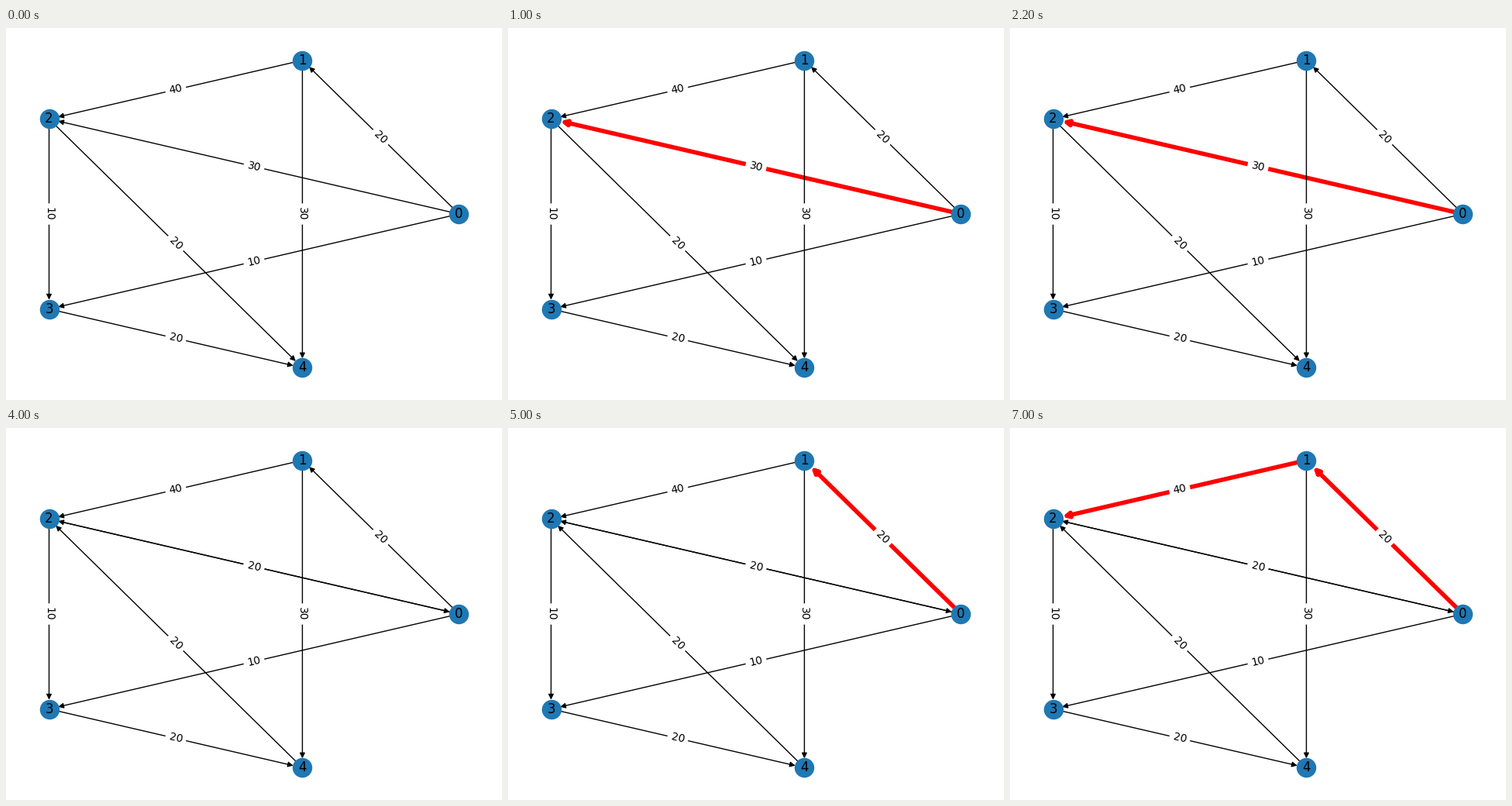
A matplotlib script for the animation above (8000 ms loop, 640 by 480 pixels).

```python
import math

import matplotlib.pyplot as plt
from matplotlib.animation import FuncAnimation
from matplotlib.patches import FancyArrowPatch

plt.rcParams["font.family"] = "DejaVu Sans"

NODE_SIZE = 300
SHRINK = math.sqrt(NODE_SIZE) / 2
PAD = 0.105  # margin around the nodes, as a share of their extent

# Nodes evenly spaced on the unit circle
POS = [(math.cos(2 * math.pi * k / 5), math.sin(2 * math.pi * k / 5))
       for k in range(5)]

# (tail, head): capacity
START = {(0, 1): 20, (0, 2): 30, (0, 3): 10, (1, 2): 40, (1, 4): 30,
         (2, 3): 10, (2, 4): 20, (3, 4): 20}
RESIDUAL = {(0, 1): 20, (0, 2): 10, (0, 3): 10, (1, 2): 40, (1, 4): 30,
            (2, 3): 10, (2, 0): 20, (3, 4): 20, (4, 2): 20}

# One entry per second: the graph and the highlighted path
STEPS = [
    (START, []),
    (START, [(0, 2)]),
    (START, [(0, 2)]),
    (START, [(0, 2), (2, 4)]),
    (RESIDUAL, []),
    (RESIDUAL, [(0, 1)]),
    (RESIDUAL, [(0, 1)]),
    (RESIDUAL, [(0, 1), (1, 2)]),
]

fig = plt.figure(figsize=(6.4, 4.8), dpi=100, facecolor="white")
ax = fig.add_axes((0, 0, 1, 1))


def padded(values):
    low, high = min(values), max(values)
    pad = PAD * (high - low)
    return low - pad, high + pad


XLIM = padded([x for x, _ in POS])
YLIM = padded([y for _, y in POS])


def draw_edge(tail, head, on_path):
    ax.add_patch(FancyArrowPatch(
        POS[tail], POS[head], arrowstyle="-|>", mutation_scale=10,
        shrinkA=SHRINK, shrinkB=SHRINK, zorder=1,
        color="red" if on_path else "black",
        linewidth=4 if on_path else 1))


def draw_capacity(tail, head, capacity):
    (x1, y1), (x2, y2) = POS[tail], POS[head]
    dx = (x2 - x1) * 640 / (XLIM[1] - XLIM[0])
    dy = (y2 - y1) * 480 / (YLIM[1] - YLIM[0])
    angle = round(math.degrees(math.atan2(dy, dx)), 6)
    # Keep the label from standing upside down
    if angle > 90:
        angle -= 180
    elif angle < -90:
        angle += 180
    ax.text((x1 + x2) / 2, (y1 + y2) / 2, str(capacity), size=10,
            ha="center", va="center", rotation=angle, zorder=1,
            bbox=dict(boxstyle="round", ec="white", fc="white"))


def draw_nodes():
    xs, ys = zip(*POS)
    ax.scatter(xs, ys, s=NODE_SIZE, c="#1f78b4", zorder=2)
    for node, (x, y) in enumerate(POS):
        ax.text(x, y, str(node), size=12, ha="center", va="center")


def draw(second):
    graph, path = STEPS[second]
    ax.clear()
    ax.axis("off")
    for edge in graph:
        draw_edge(*edge, edge in path)
    for edge, capacity in graph.items():
        draw_capacity(*edge, capacity)
    draw_nodes()
    ax.set_xlim(XLIM)
    ax.set_ylim(YLIM)
    return []


anim = FuncAnimation(fig, draw, frames=len(STEPS), interval=1000,
                     init_func=lambda: [], repeat=True, repeat_delay=0)
plt.show()
```
